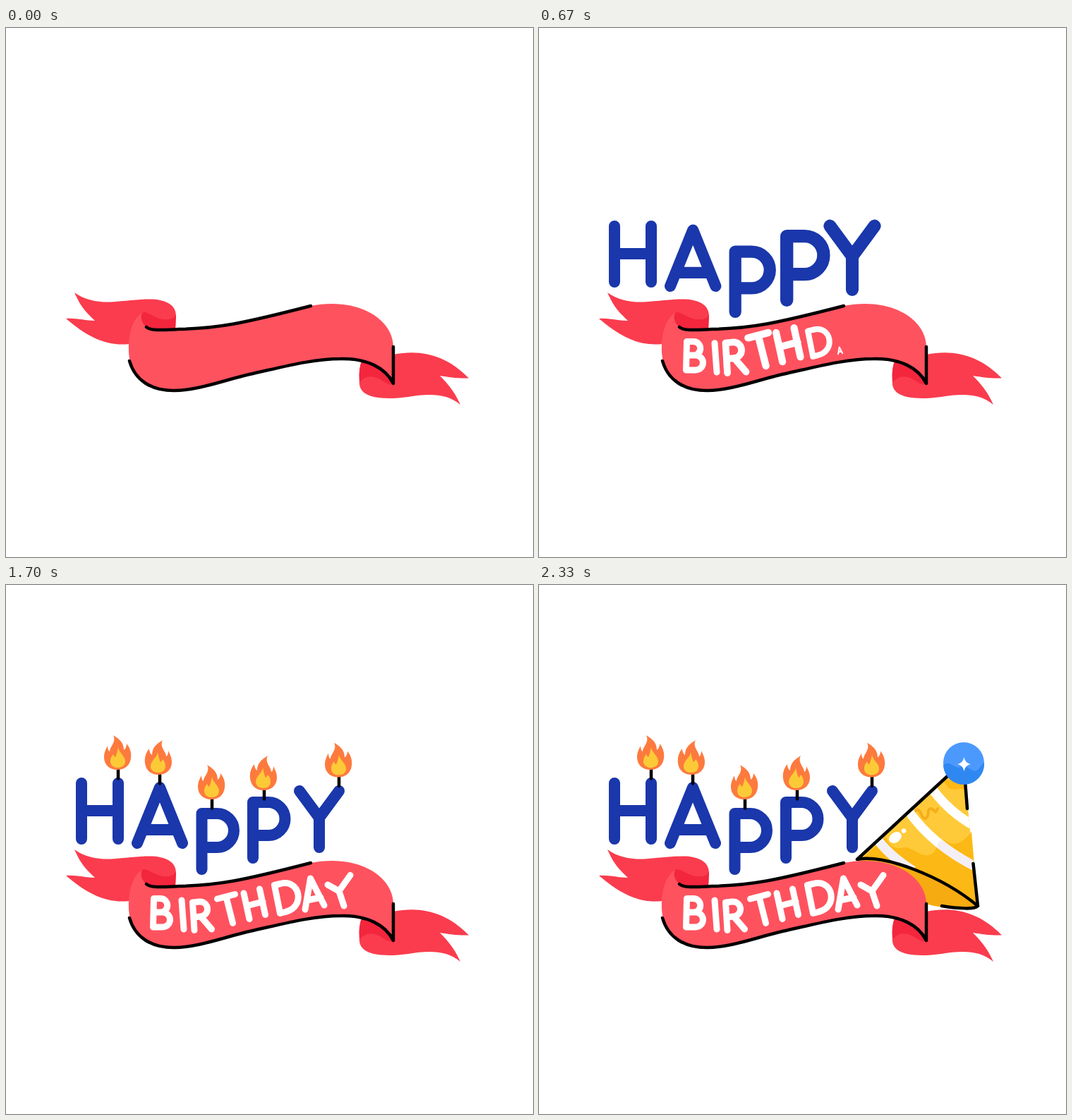
Animation, 747 px wide and 750 px high, one loop 4.01 s. Source, as an HTML page:

```html
<!DOCTYPE html>
<html lang="en">
<head>
<meta charset="utf-8">
<title>Happy Birthday</title>
<style>
  html, body { margin: 0; width: 100%; height: 100%; overflow: hidden; background: #fff; }
  svg { display: block; width: 100vw; height: 100vh; }
  .line { fill: none; stroke: #000; stroke-width: 4.5; }
  #happy { fill: none; stroke: #1a37ab; stroke-width: 16; }
  #birthday { fill: none; stroke: #fff; stroke-width: 9; }
</style>
</head>
<body>
<svg viewBox="0 0 747 750" stroke-linecap="round" stroke-linejoin="round" role="img" aria-label="Happy Birthday">
  <defs>
    <path id="cone" d="M451 389L580 270L604 278L622 455C570 412 490 382 451 389Z"/>
    <path id="shade" d="M458 388L492 357C495 370 505 376 518 372C530 372 540 385 552 383C568 380 560 360 575 362C590 372 600 366 613 350L622 455C570 412 490 382 451 389Z"/>
    <path id="stripes" d="M558 290Q582 322 616 341M523 319Q556 368 622 401M479 360Q498 385 530 405" fill="none" stroke-width="13" stroke-linecap="butt"/>
    <clipPath id="inCone"><use href="#cone"/></clipPath>
    <clipPath id="inShade"><use href="#shade"/></clipPath>
    <g id="flame">
      <path fill="#fd7a3e" d="M-6-49C2-44 9-39 9-28C12-30 13-34 13-37C18-31 20-24 19-17C18-6 10 0 0 0C-11 0-19-7-19-18C-19-25-16-30-14-34C-14-30-13-27-11-26C-11-33-1-39-6-49Z"/>
      <path fill="#fdca37" d="M1-32C2-24 11-20 11-12C11-6 6-3 0-3C-6-3-10-7-10-12C-10-17-8-20-6-22C-5-20-4-18-3-18C-1-22 0-27 1-32Z"/>
    </g>
  </defs>

  <!-- ribbon tails -->
  <g fill="#fa3c4e">
    <path d="M97 375C112 386 130 389 148 388.500C170 387 190 384 208 384.500C228 386 241 393 241 408L240 428H200L175 448C140 452 112 435 85 412C100 411 112 415 126 415C115 404 107 398 97 375Z"/>
    <path d="M549 463C590 455 625 465 656 496.500C640 497 628 495 615 493C628 506 637 518 644 534C625 518 600 518 570 523C540 527 503 527 501 505C500 492 501 482 504 472L549 500Z"/>
    <g fill="#f3263d">
      <path d="M241 406C238 413 230 414 222 413C210 411 203 403 195 403C188 405 190 418 200 424L210 428H240Z"/>
      <path d="M504 472C500 484 500 494 502 502C508 494 518 492 528 497C536 501 542 507 549 505C540 487 524 475 504 472Z"/>
    </g>
  </g>

  <g id="happy"></g>

  <g id="hat">
    <path fill="#f6ab11" d="M451 389C490 382 570 412 622 455C620 463 590 460 560 455C520 446 455 410 451 389Z"/>
    <use href="#cone" fill="#ffca39"/>
    <use href="#shade" fill="#fcb814"/>
    <g clip-path="url(#inCone)">
      <path fill="#fcb814" d="M572 277L603 276L605 293C597 283 590 295 580 287Z"/>
      <use href="#stripes" stroke="#fff"/>
      <g clip-path="url(#inShade)"><use href="#stripes" stroke="#f3eff5"/></g>
    </g>
    <path fill="none" stroke="#f5ae1a" stroke-width="4" d="M534 320C542 314 541 333 548 331C555 328 548 317 556 317C562 320 561 326 565 317"/>
    <ellipse cx="505" cy="358" rx="9.500" ry="7" transform="rotate(-35 505 358)" fill="#fff"/>
    <circle cx="517" cy="348.500" r="3.300" fill="#fff"/>
    <path class="line" d="M451 389L580 270M451 389C490 382 570 412 622 455M604 278L607 317M615.500 395L622 455C618 460 595 459 571 455"/>
    <circle cx="602" cy="252" r="29" fill="#4c99fd"/>
    <path fill="#2f87f1" d="M573 256C582 246 588 262 598 258C610 254 612 268 622 262C626 258 628 254 631 252A29 29 0 0 1 573 256Z"/>
    <path fill="#fff" d="M602.500 244Q604 252.500 612 254Q604 255.500 602.500 264Q601 255.500 593 254Q601 252.500 602.500 244Z"/>
  </g>

  <!-- ribbon front -->
  <path fill="#ff525f" d="M193 404C180 412 173 432 174 460C177 500 206 514 238 514C272 514 310 499 345 491C395 480 435 469 474 469C512 468 538 482 549 504V452C549 420 515 391 462 391C452 391 442 392 432 394C335 419 300 426 245 427C225 428 205 430 199 424C192 419 190 410 193 404Z"/>
  <path class="line" d="M199 424C205 430 225 428 245 427C300 426 335 419 432 394M175 472C183 500 206 514 238 514C272 514 310 499 345 491C395 480 435 469 474 469C512 468 538 482 549 504V452"/>

  <g id="birthday"></g>
  <g id="candles"></g>
</svg>
<script>
const LOOP = 4010;
const $ = id => document.getElementById(id);

// [pivot x, pivot y, strokes]
const happy = [
  [99, 369, "M107 281V360M159 281V360M107 320H159"],
  [178, 375, "M186 366L218 287L250 366M195 347H241"],
  [269, 411, "M277.500 403V324H299A24 24 0 0 1 299 372H278"],
  [342, 395, "M350 387V308H372A23.500 23.500 0 0 1 372 355H350"],
  [444, 380, "M416 292L444 330V372M472 292L444 330"]
];
const birthday = [
  [204, 489, "M208.500 485L209.500 444.500H219A9.700 9.700 0 0 1 219 464H209M219 464H222A10.500 10.500 0 0 1 222 485H208.500"],
  [250, 491, "M249 447L252 488"],
  [266, 494, "M267 489.500L264.500 450L274 449A10.500 10.500 0 0 1 276 470L266 471M276 470L291.500 488"],
  [321, 483, "M299.500 445L324.500 438.500M312 442L321.500 479.500"],
  [344, 476, "M337 437L345 473.500M359.500 431L367.500 467.500M341 455L364 449"],
  [387, 469, "M380.500 425.500L388.500 465.500L396 463.500C425 457 417 416 389 423.500Z"],
  [424, 463, "M424 460L431.500 416L451 454M427 447L446 443"],
  [479, 459, "M456 425L472 434L488 411.500M472 434L479 455"]
];
// [flame x, flame base, wick x, mirror]
const candles = [
  [158, 262, 159, 1], [216, 269, 218, -1], [291, 304, 292, 1], [365, 291, 366, -1], [471, 272.5, 472, 1]
];

function add(parent, tag, attrs) {
  const el = document.createElementNS("http://www.w3.org/2000/svg", tag);
  for (const k in attrs) el.setAttribute(k, attrs[k]);
  return parent.appendChild(el);
}

const scaleAt = (el, x, y, s) => {
  el.setAttribute("transform", `translate(${x} ${y}) scale(${s}) translate(${-x} ${-y})`);
  el.style.display = s > 0 ? "" : "none";
};

const clamp = x => Math.min(1, Math.max(0, x));
const inOut = x => (1 - Math.cos(Math.PI * clamp(x))) / 2;

// Grows past full size, then settles at 1.
function pop(t, fall) {
  const rise = 300, peak = 1.15;
  return t < rise
    ? peak * (1 - (1 - clamp(t / rise)) ** 3)
    : peak + (1 - peak) * inOut((t - rise) / fall);
}

const letters = [[happy, "happy"], [birthday, "birthday"]].flatMap(([list, id]) =>
  list.map(([x, y, d], i) => ({ x, y, start: 50 + 100 * i, el: add($(id), "path", { d }) })));

const flames = candles.map(([x, y, wx, flip]) => ({
  x, y, flip, wx,
  wick: add($("candles"), "path", { class: "line" }),
  el: add($("candles"), "use", { href: "#flame" })
}));

function draw(t) {
  for (const l of letters) scaleAt(l.el, l.x, l.y, pop(t - l.start, 250));

  const grown = clamp((t - 1100) / 100), size = inOut((t - 1150) / 360);
  for (const f of flames) {
    f.wick.setAttribute("d", `M${f.wx} ${f.y + 12.5}v${-13 * grown}`);
    f.wick.style.display = grown > 0 ? "" : "none";
    f.el.setAttribute("transform", `translate(${f.x} ${f.y}) scale(${size * f.flip} ${size})`);
    f.el.style.display = size > 0 ? "" : "none";
  }

  scaleAt($("hat"), 509, 416, pop(t - 1700, 330));
}

const begin = performance.now();
function tick() {
  draw((performance.now() - begin) % LOOP);
  requestAnimationFrame(tick);
}
draw(0);
requestAnimationFrame(tick);
</script>
</body>
</html>
```
